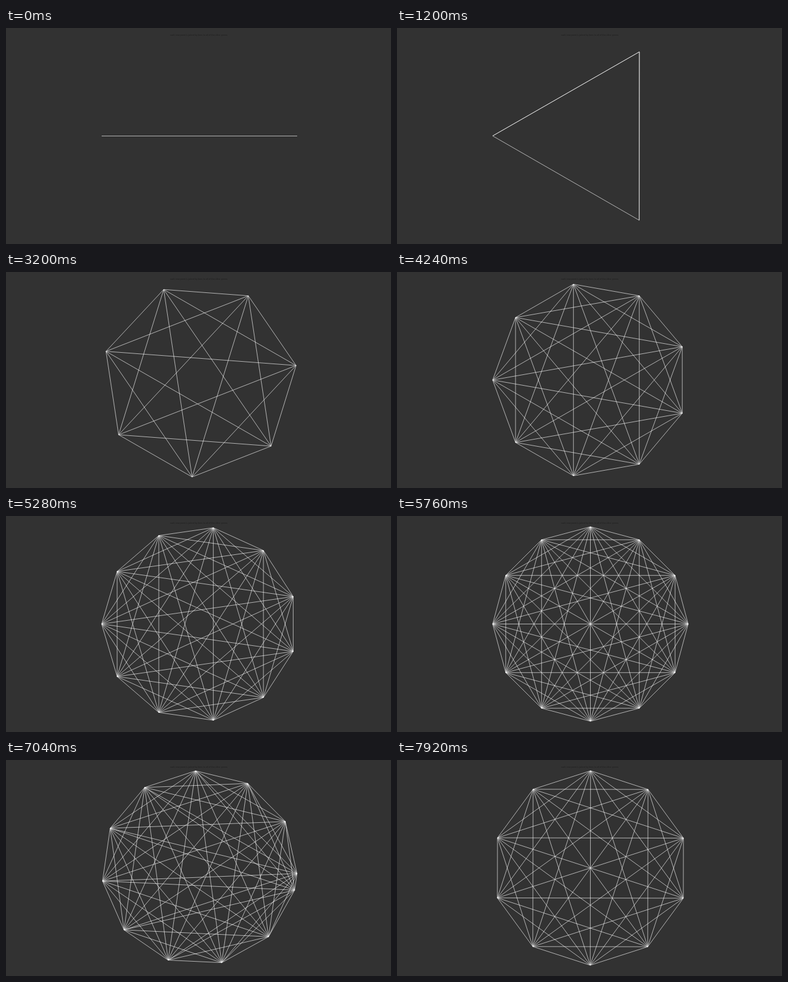
Write an HTML page with a canvas that moves like this. It is 640 by 361 pixels and loops after 8000 ms.

```html
<!DOCTYPE html>
<html lang="en">
<head>
<meta charset="utf-8">
<title>Complete graphs</title>
<style>
  html, body { margin: 0; width: 100%; height: 100%; overflow: hidden; background: #323232; }
  canvas { display: block; width: 640px; height: 361px; }
</style>
</head>
<body>
<canvas id="stage"></canvas>
<script>
const LOOP = 8000;
const CX = 321.5, CY = 180.5, RADIUS = 162.5;
const TURN = 60, TURN_TIME = 330;
const FIRST = 2, LAST = 13;
const GROW = { start: 660, period: 520 };
const SHRINK = { start: 6350, period: 491 };

const canvas = document.getElementById('stage');
const ratio = window.devicePixelRatio || 1;
canvas.width = 640 * ratio;
canvas.height = 361 * ratio;
const ctx = canvas.getContext('2d');
ctx.scale(ratio, ratio);

const clamp = x => Math.min(1, Math.max(0, x));
const inOut = x => x < 0.5 ? 4 * x ** 3 : 1 - 4 * (1 - x) ** 3;
const out = x => 1 - (1 - x) ** 3;

// Angles in degrees; one vertex splits off (or merges into) the last one.
function fan(base, small, blend) {
  const from = 360 / small, to = 360 / (small + 1);
  const step = from + (to - from) * blend;
  const angles = Array.from({ length: small }, (_, k) => base + k * step);
  angles.push(base + 360 - from + (from - to) * blend);
  return angles;
}

function regular(base, n) {
  return Array.from({ length: n }, (_, k) => base + 360 * k / n);
}

function anglesAt(t) {
  if (t < GROW.start) return regular(0, FIRST);
  const growing = t < SHRINK.start;
  const { start, period } = growing ? GROW : SHRINK;
  const i = Math.floor((t - start) / period);
  const local = t - start - i * period;
  const turns = growing ? i : LAST - FIRST + i;
  const base = TURN * (turns + inOut(clamp(local / TURN_TIME)));

  if (!growing) return fan(base, LAST - 1 - i, 1 - out(clamp((local - 100) / 320)));
  if (FIRST + i >= LAST) return regular(TURN * (LAST - FIRST), LAST);
  return fan(base, FIRST + i, inOut(clamp((local - 140) / 252)));
}

function caption() {
  ctx.font = '3.6px "Open Sans", sans-serif';
  ctx.textAlign = 'center';
  ctx.fillStyle = 'rgba(16, 16, 16, 0.6)';
  ctx.fillText('each new point is joined by lines to all of the other points', 320.5, 13.4);
}

function draw(t) {
  ctx.fillStyle = '#323232';
  ctx.fillRect(0, 0, 640, 361);
  caption();
  ctx.strokeStyle = 'rgba(255, 255, 255, 0.8)';
  ctx.lineWidth = 0.8;
  const points = anglesAt(t).map(a => {
    const rad = a * Math.PI / 180;
    return [CX + RADIUS * Math.cos(rad), CY + RADIUS * Math.sin(rad)];
  });
  points.forEach((p, i) => {
    for (const q of points.slice(i + 1)) {
      ctx.beginPath();
      ctx.moveTo(...p);
      ctx.lineTo(...q);
      ctx.stroke();
    }
  });
}

let origin;
function tick(now) {
  origin ??= now;
  draw((now - origin) % LOOP);
  requestAnimationFrame(tick);
}
draw(0);
requestAnimationFrame(tick);
</script>
</body>
</html>
```
